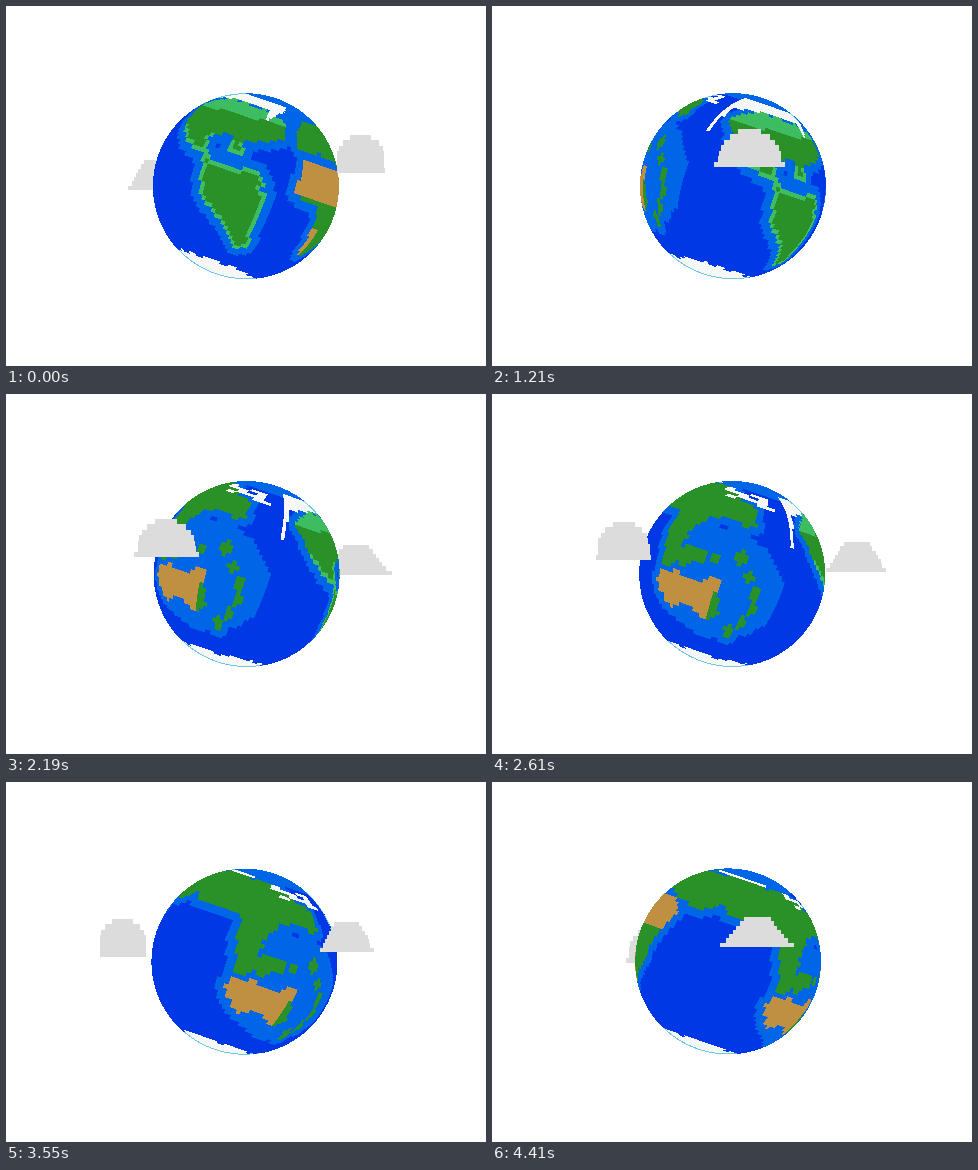
Recreate the animation shown at these times as an HTML page with a canvas. Size 480 by 360 pixels, loop 4.44 s.

```html
<!DOCTYPE html>
<html lang="en">
<head>
<meta charset="utf-8">
<title>Pixel globe</title>
<style>
  html, body { margin: 0; width: 100%; height: 100%; overflow: hidden; background: #fff; }
  canvas { display: block; }
</style>
</head>
<body>
<canvas id="stage" width="480" height="360"></canvas>
<script>
const LOOP = 4440, SPIN = 47.7, ORBIT = 48, RADIUS = 93, SIZE = 200;
const DEG = Math.PI / 180, TILT = 19 * DEG;
const COLS = 128, ROWS = 64, CELL = 360 / COLS;

const DEEP = [0, 56, 230], SHELF = [0, 102, 232], LEAF = [42, 144, 40],
      TUNDRA = [62, 188, 98], SAND = [192, 144, 66], ICE = [246, 247, 247], RIM = [110, 200, 225];

const ctx = document.getElementById('stage').getContext('2d');

const noise = (a, b) => {
  const v = Math.sin(a * 12.9898 + b * 78.233) * 43758.5453;
  return v - Math.floor(v);
};

// Outlines in degrees: longitude, latitude; longitude 0 faces the viewer at the start.
const outline = (...points) => {
  const path = new Path2D();
  points.forEach(([lon, lat]) => path.lineTo(lon, lat));
  return (lon, lat) => ctx.isPointInPath(path, lon, lat);
};
const oval = (x, y, rx, ry) => (lon, lat) => Math.hypot((lon - x) / rx, (lat - y) / ry) < 1;

const americaColor = (lon, lat, coast) =>
  lat > 47 + lon * 0.07 || (coast && lat < 25) ? TUNDRA : LEAF;
const africaColor = (lon, lat) => lat > 7 || (lon < 66 && lat < -12) ? SAND : LEAF;
const australiaColor = (lon, lat) => lon > 228 && lat < -14 ? LEAF : SAND;
const leafy = () => LEAF;

const lands = [
  { has: outline([-63, 20], [-82, 45], [-55, 58], [-2, 57], [18, 50], [16, 37], [-13, 26], [-25, 29],
      [-37, 22], [-27, 9], [6, 11], [13, -3], [16, -41], [8, -41], [-29, -12], [-32, 8], [-46, 14]),
    color: americaColor },
  { has: oval(-14, 21, 6, 5), color: americaColor },
  { has: outline([26, 34], [30, 48], [40, 59], [195, 62], [240, 46], [240, 33], [206, 32], [198, 13],
      [194, -9], [186, -8], [177, 28], [138, 29], [133, 34], [120, 25], [50, 36]),
    color: leafy },
  { has: outline([35, 28], [30, 5], [54, 1], [60, -28], [69, -30], [84, -20], [96, 3], [104, 19], [90, 29]),
    color: africaColor },
  { has: outline([183, -19], [190, -10], [218, -11], [229, -4], [235, -28], [226, -36], [214, -27], [197, -34]),
    color: australiaColor }
];

// Two island chains.
for (let i = 0; i < 3; i++)
  lands.push({ has: oval(203 + 9 * i, 2 + 2 * i, 6 - 1.5 * i, 6 - i), color: leafy });
for (let i = 0; i < 6; i++)
  lands.push({ has: oval(238 + 17 * Math.sin(i * 0.52), 11 - 9.5 * i, 3, 5), color: leafy });

const shelves = [oval(228, -10, 44, 37), oval(20, 57, 20, 10), (lon, lat) => lat > 66];

const arcticIce = outline([-103, 28], [-88, 28], [-84, 53], [-55, 58], [-2, 58], [-2, 48],
  [24, 70], [-110, 70], [-118, 50]);
const frozen = (lon, lat, col, row) =>
  arcticIce(lon, lat) ||
  (lon > 85 && lon < 165 && lat > 62 && lat < 66) ||
  (lon > 190 && lon < 255 && lat > 50 && lat < 62 && noise(col >> 2, row) > 0.45) ||
  lat < -67 + 6 * Math.max(0, Math.cos((lon + 18) * DEG)) + 3 * noise(col >> 2, 1);

function buildMap() {
  const grid = (pick) => Array.from({ length: COLS * ROWS }, (_, i) => {
    const col = i % COLS, row = Math.floor(i / COLS);
    const lon = (col + 0.5) * CELL;
    return pick(lon > 270 ? lon - 360 : lon, 90 - (row + 0.5) * CELL, col, row);
  });
  // A small wobble per block of cells makes the coasts ragged.
  const ground = grid((lon, lat, col, row) => {
    const x = lon + 2 * noise(col >> 1, row) - 1, y = lat + 2 * noise(row, col >> 1) - 1;
    return lands.find(land => land.has(x, y));
  });
  const near = (col, row, reach, test) => {
    for (let dy = -2; dy <= 2; dy++)
      for (let dx = -2; dx <= 2; dx++) {
        const y = Math.max(0, Math.min(ROWS - 1, row + dy)), x = (col + dx + COLS) % COLS;
        if (dx * dx + dy * dy <= reach && test(ground[y * COLS + x])) return true;
      }
    return false;
  };
  return grid((lon, lat, col, row) => {
    if (frozen(lon, lat, col, row)) return ICE;
    const land = ground[row * COLS + col];
    if (land) return land.color(lon, lat, near(col, row, 1, other => !other));
    const shallow = shelves.some(has => has(lon, lat)) || near(col, row, 5, Boolean);
    return shallow ? SHELF : DEEP;
  });
}

const map = buildMap();
const globe = document.createElement('canvas');
globe.width = globe.height = SIZE;
const globeCtx = globe.getContext('2d');
const image = globeCtx.createImageData(SIZE, SIZE);

function drawGlobe(cx, cy, facing) {
  const left = Math.round(cx) - SIZE / 2, top = Math.round(cy) - SIZE / 2;
  const cos = Math.cos(TILT) / RADIUS, sin = Math.sin(TILT) / RADIUS;
  image.data.fill(0);
  for (let y = 0; y < SIZE; y++)
    for (let x = 0; x < SIZE; x++) {
      const dx = left + x + 0.5 - cx, dy = top + y + 0.5 - cy;
      const reach = Math.hypot(dx, dy);
      if (reach > RADIUS) continue;
      const east = dx * cos + dy * sin, north = dx * sin - dy * cos;
      const lat = Math.asin(north) / DEG;
      const ratio = east / Math.sqrt(1 - north * north);
      const lon = facing + Math.asin(Math.max(-1, Math.min(1, ratio))) / DEG;
      const col = Math.floor((lon + 720) / CELL) % COLS;
      const row = Math.min(ROWS - 1, Math.floor((90 - lat) / CELL));
      const color = map[row * COLS + col];
      const edge = color === ICE && reach > RADIUS - 1;
      image.data.set([...(edge ? RIM : color), 255], (y * SIZE + x) * 4);
    }
  globeCtx.putImageData(image, 0, 0);
  ctx.drawImage(globe, left, top);
}

const clouds = [
  { start: 65.8, yaw: 5, base: 172, width: 36, height: 38, dome: 32, curve: 3 },
  { start: 225, yaw: 20, base: 176, width: 41, height: 30, dome: 38, curve: 1 }
];

// A flat brim with a stepped dome; the upper steps are rounder seen from above.
function drawCloud(cloud, angle, cx) {
  const STEPS = 7, turn = (angle + cloud.yaw) * DEG;
  const x = cx + 126 * Math.sin(angle * DEG), y = cloud.base - 11 * Math.cos(angle * DEG);
  ctx.fillStyle = '#dcdcdc';
  for (let i = 0; i < STEPS; i++) {
    const h = i / (STEPS - 1), top = Math.round(cloud.height * (i + 1) / STEPS);
    const wide = i ? cloud.dome * (1 - 0.64 * h ** cloud.curve) : cloud.width;
    const half = wide * Math.hypot(Math.cos(turn), (0.62 + 0.3 * h) * Math.sin(turn));
    ctx.fillRect(Math.round(x - half), Math.round(y) - top, Math.round(2 * half), top);
  }
}

function draw(ms) {
  const t = ms % LOOP / 1000;
  const cx = 241 - 0.55 * (t - 1.4) ** 2, cy = 180.2 - 0.04 * t * t;
  const placed = clouds.map(cloud => ({ cloud, angle: cloud.start - ORBIT * t }));
  const inFront = ({ angle }) => Math.cos(angle * DEG) > 0;
  const show = ({ cloud, angle }) => drawCloud(cloud, angle, cx);

  ctx.fillStyle = '#fff';
  ctx.fillRect(0, 0, 480, 360);
  placed.filter(p => !inFront(p)).forEach(show);
  drawGlobe(cx, cy, -SPIN * t);
  placed.filter(inFront).forEach(show);
}

function tick() {
  draw(performance.now());
  requestAnimationFrame(tick);
}
tick();
</script>
</body>
</html>
```
